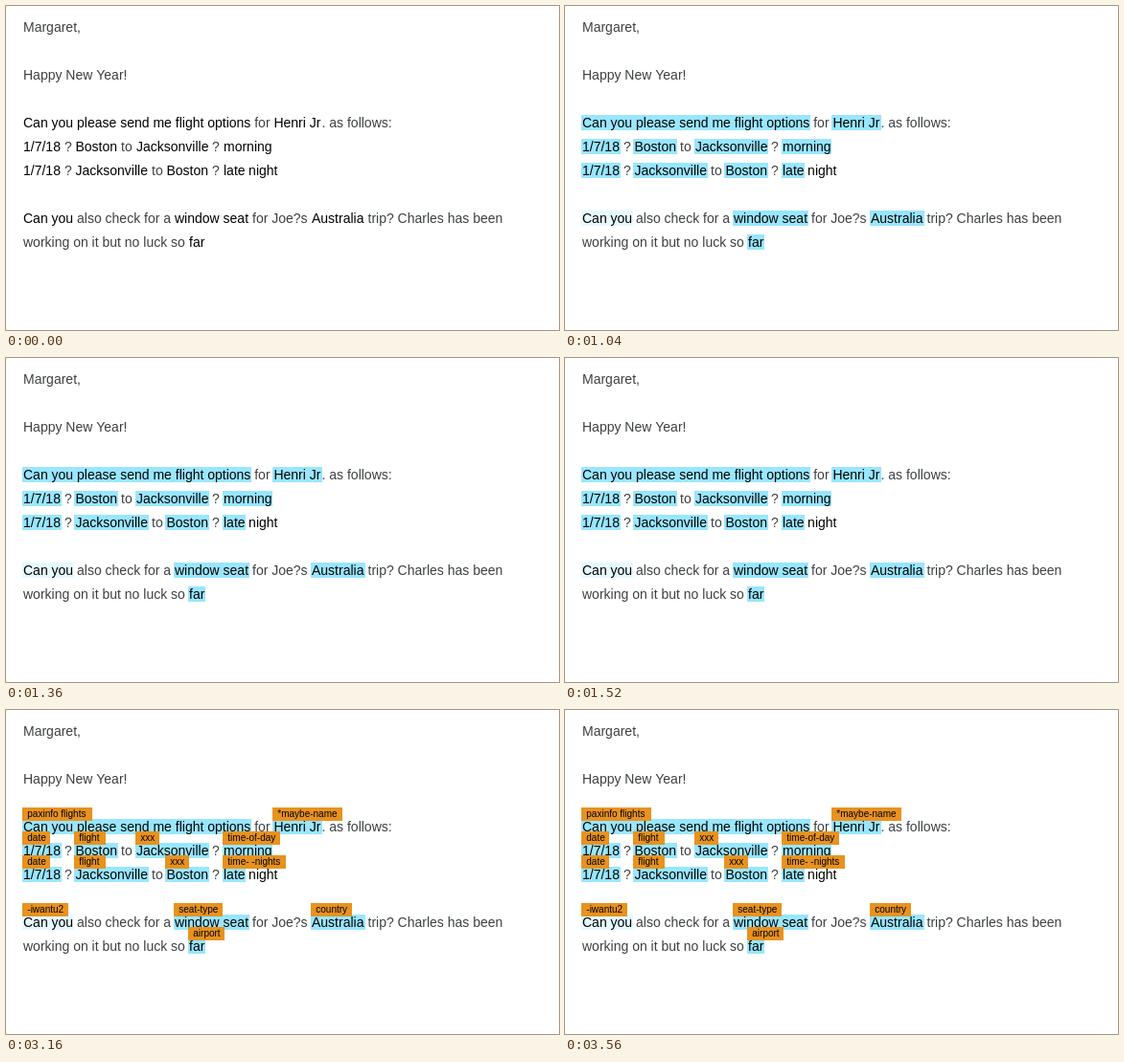
An HTML page with a canvas for the animation above (6960 ms loop, 577 by 339 pixels).

```html
<!DOCTYPE html>
<html lang="en">
<head>
<meta charset="utf-8">
<title>Annotated message</title>
<style>
  html, body { margin: 0; width: 100%; height: 100%; overflow: hidden; background: #fff; }
  canvas { display: block; }
</style>
</head>
<body>
<canvas id="stage" width="577" height="339"></canvas>
<script>
const ctx = document.getElementById('stage').getContext('2d');

const LOOP = 6960, MARK_AT = 920, LABEL_AT = 2840;
const FAMILY = '"Liberation Sans", Arial, sans-serif';
const GRAY = '#3c4043', BLACK = '#000';
const BLUE = '#99e6ff', PALE = '#e6f9ff', ORANGE = '#e8921f';

// Plain text: baseline, x, text
const plain = [
  [27, 18, 'Margaret,'],
  [77, 18, 'Happy New Year!'],
  [127, 259.2, 'for'],
  [127, 329.5, '. as follows:'],
  [152, 61, '?'], [152, 120, 'to'], [152, 215, '?'],
  [177, 61, '?'], [177, 152, 'to'], [177, 215, '?'],
  [227, 74, 'also check for a'],
  [227, 257, 'for Joe?s'],
  [227, 377.5, 'trip? Charles has been'],
  [252, 18, 'working on it but no luck so'],
];

// Recognised phrases: baseline, x, text, right edge of mark, label, right edge of label
const phrases = [
  [127, 18, 'Can you please send me flight options', 256, 'paxinfo flights', 90],
  [127, 279.4, 'Henri Jr', 330, '*maybe-name', 351],
  [152, 18, '1/7/18', 58, 'date', 46],
  [152, 72.5, 'Boston', 117, 'flight', 104],
  [152, 136, 'Jacksonville', 212, 'xxx', 160],
  [152, 227, 'morning', 278, 'time-of-day', 286],
  [177, 18, '1/7/18', 58, 'date', 46],
  [177, 72.5, 'Jacksonville', 149, 'flight', 104],
  [177, 167.4, 'Boston', 212, 'xxx', 191],
  [177, 227, 'late', 250, 'time- -nights', 292],
  [227, 18, 'Can you', 71, '-iwantu2', 65],
  [227, 176, 'window seat', 254, 'seat-type', 226],
  [227, 319, 'Australia', 375, 'country', 361],
  [252, 191, 'far', 208, 'airport', 228],
];

function box(color, left, top, right, height) {
  ctx.fillStyle = color;
  ctx.fillRect(left, top, right - left, height);
}

function write(text, x, y, color, size = 14) {
  ctx.font = `${size}px ${FAMILY}`;
  ctx.fillStyle = color;
  ctx.fillText(text, x, y);
}

const leftEdge = x => Math.floor(x) - 1;

function draw(time) {
  box('#fff', 0, 0, 577, 339);
  if (time >= MARK_AT) {
    for (const [y, x, text, right] of phrases) {
      box(text === 'Can you' ? PALE : BLUE, leftEdge(x), y - 13, right, 16);
    }
  }
  for (const [y, x, text] of plain) write(text, x, y, GRAY);
  for (const [y, x, text] of phrases) write(text, x, y, BLACK);
  write('night', 253.1, 177, BLACK);

  if (time >= LABEL_AT) {
    for (const [y, x, , , label, right] of phrases) {
      const left = leftEdge(x);
      box(ORANGE, left, y - 25, right, 14);
      write(label, left + 5.3, y - 15, BLACK, 10);
    }
  }
}

function tick() {
  draw(performance.now() % LOOP);
  requestAnimationFrame(tick);
}
tick();
</script>
</body>
</html>
```
